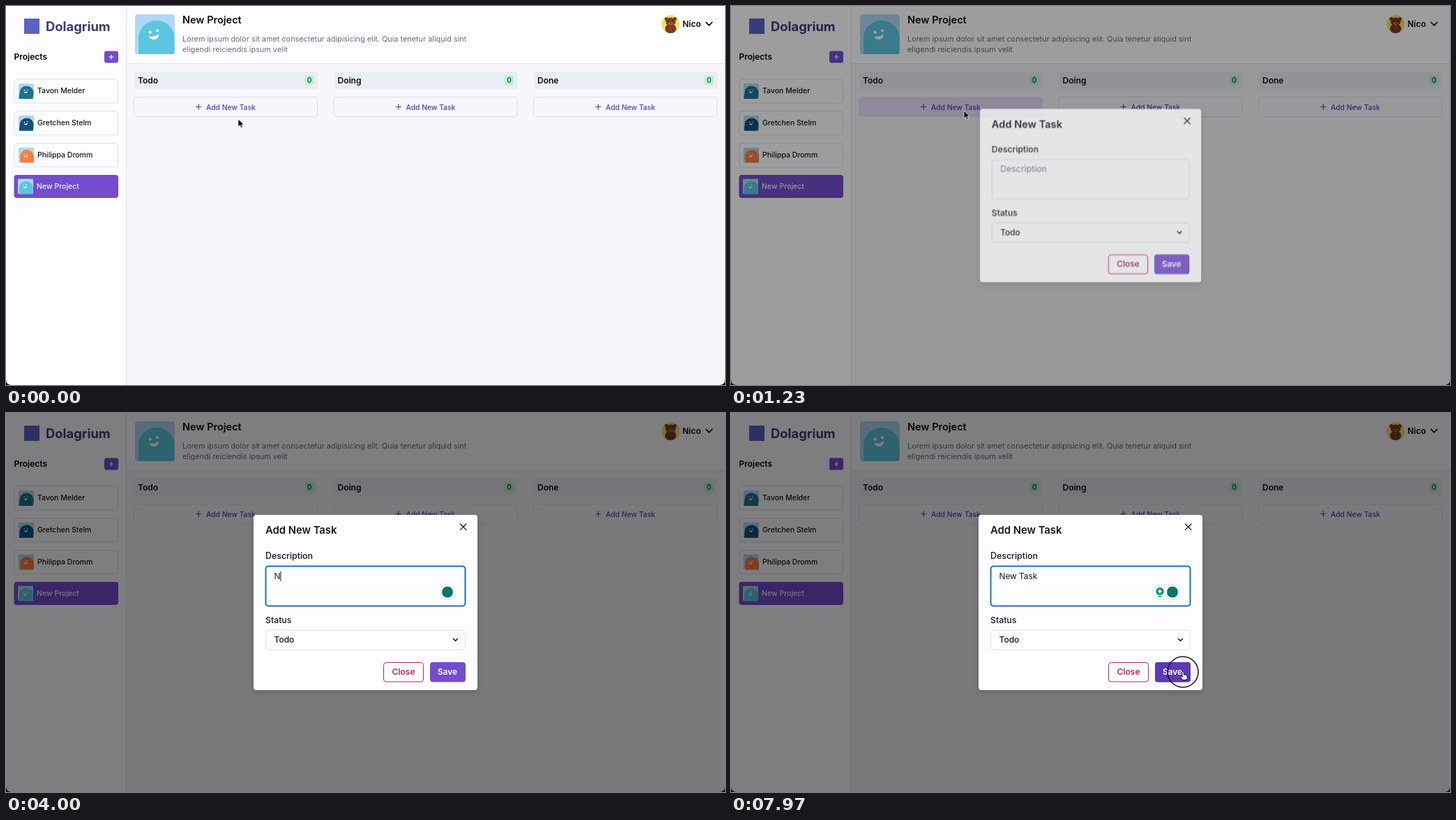
Recreate the animation shown at these times as an HTML page. Size 1031 px wide and 543 px high, loop 8 s.

```html
<!DOCTYPE html>
<html lang="en">
<head>
<meta charset="utf-8">
<title>Task board</title>
<style>
html, body { margin: 0; width: 100%; height: 100%; overflow: hidden; background: #000; }
svg { display: block; width: 1031px; height: 543px; font-family: Inter, "Open Sans", sans-serif; font-weight: 500; }
.line { fill: none; stroke-linecap: round; stroke-linejoin: round; }
.box { fill: none; stroke: #e1e0ea; }
.bold { font-weight: 600; }
.mid { text-anchor: middle; }
.loop { animation: 8s linear infinite; }
.step { animation: 8s step-end infinite; }

#backdrop { animation-name: fade; }
#modal { animation-name: pop; transform-origin: 515.5px 271.5px; }
#hover { animation-name: hover; }
#cursor { animation-name: move; }
#pointer { animation-name: seen; }
#arrow { animation-name: arrow; }
#hand, #saveHover { animation-name: onSave; }
#focus { animation-name: focus; }
#pill { animation-name: pill; }
#ring { animation-name: ring; }

@keyframes fade {
  0% { opacity: 0; }
  14.625% { opacity: 0; animation-timing-function: cubic-bezier(0, 0, .2, 1); }
  16.5%, 100% { opacity: 1; }
}
@keyframes pop {
  0% { opacity: 0; transform: scale(.95); }
  14.625% { opacity: 0; transform: scale(.95); animation-timing-function: cubic-bezier(0, 0, .2, 1); }
  16.5%, 100% { opacity: 1; transform: scale(1); }
}
@keyframes hover {
  0%, 5% { opacity: 0; }
  6.8%, 17.5% { opacity: 1; }
  19.4%, 100% { opacity: 0; }
}
@keyframes move {
  0% { transform: translate(333px, 162px); }
  3% { transform: translate(333px, 162px); animation-timing-function: ease-in-out; }
  10% { transform: translate(334px, 149px); }
  15.4% { transform: translate(334px, 150px); }
  25% { transform: translate(334px, 150px); animation-timing-function: ease-in; }
  31.625% { transform: translate(377px, 189px); animation-timing-function: ease-out; }
  39% { transform: translate(450px, 240px); }
  78% { transform: translate(450px, 240px); animation-timing-function: ease-in-out; }
  93%, 100% { transform: translate(648px, 371px); }
}
@keyframes seen { 0% { opacity: 1; } 48.75% { opacity: 0; } 78%, 100% { opacity: 1; } }
@keyframes arrow { 0% { opacity: 1; } 89.3%, 100% { opacity: 0; } }
@keyframes onSave { 0% { opacity: 0; } 89.3%, 100% { opacity: 1; } }
@keyframes focus { 0% { opacity: 0; } 42%, 100% { opacity: 1; } }
@keyframes pill { 0% { opacity: 0; } 80%, 100% { opacity: 1; } }
@keyframes ring { 0% { opacity: 0; } 99%, 100% { opacity: 1; } }
</style>
</head>
<body>
<svg viewBox="0 0 1031 543">
  <defs>
    <clipPath id="tile"><rect width="100" height="100" rx="7"/></clipPath>
    <clipPath id="round"><circle cx="953" cy="26" r="13"/></clipPath>
    <filter id="shadow" x="-10%" y="-10%" width="120%" height="125%">
      <feDropShadow dx="0" dy="4" stdDeviation="5" flood-opacity=".16"/>
    </filter>
  </defs>

  <rect width="1031" height="543" fill="#f6f6fb"/>
  <rect width="1031" height="82" fill="#fdfcff"/>
  <rect width="173" height="543" fill="#fdfcff"/>
  <path d="M172.5 0V543M173 82.5H1031" stroke="#e2e3eb"/>

  <rect x="26" y="18" width="22" height="22" fill="#5a62c4"/>
  <text x="57" y="35.5" font-size="18.4" font-weight="700" fill="#423a78">Dolagrium</text>
  <text x="11.5" y="77" font-size="12" class="bold">Projects</text>
  <rect x="141" y="64.5" width="20" height="17" rx="3" fill="#744cce"/>
  <path class="line" d="M148 73h6M151 70v6" stroke="#fff" stroke-width="1.2"/>
  <g id="projects"></g>

  <g id="portrait"></g>
  <text x="253" y="25" font-size="14.5" class="bold" fill="#0d0d12">New Project</text>
  <g font-size="10.87" font-weight="400" fill="#686c7c">
    <text x="253" y="51">Lorem ipsum dolor sit amet consectetur adipisicing elit. Quia tenetur aliquid sint</text>
    <text x="253" y="66">eligendi reiciendis ipsum velit</text>
  </g>

  <g clip-path="url(#round)">
    <rect x="940" y="13" width="26" height="26" fill="#f4df70"/>
    <g fill="#7a4022">
      <circle cx="947" cy="18.5" r="2.6"/><circle cx="959" cy="18.5" r="2.6"/>
      <ellipse cx="953" cy="22.5" rx="7.2" ry="6"/>
      <ellipse cx="953" cy="32.5" rx="8" ry="7"/>
    </g>
    <ellipse cx="953" cy="25" rx="3" ry="2.2" fill="#a9683c"/>
    <path class="line" d="M950 21.5h.1M956 21.5h.1M953 24.2h.1" stroke="#2a130a" stroke-width="1.6"/>
    <path class="line" d="M948 30l2 5M958 30l-2 5" stroke="#54280f"/>
  </g>
  <text x="970" y="30" font-size="12" class="bold" fill="#0d0d12">Nico</text>
  <path class="line" d="M1004 23.5l4.2 4.4 4.2-4.4" stroke="#0d0d12" stroke-width="1.8"/>

  <rect id="hover" class="loop" x="183.5" y="130.5" width="263" height="28" rx="4" fill="#e8dcf8"/>
  <g id="columns"></g>

  <rect id="backdrop" class="loop" width="1031" height="543" fill-opacity=".5"/>

  <g id="modal" class="loop">
    <rect x="355" y="146" width="321" height="251" rx="4" fill="#fdfcff" filter="url(#shadow)"/>
    <text x="372" y="173" font-size="14.8" class="bold" fill="#15151b">Add New Task</text>
    <path class="line" d="M651.5 159l8.4 8.4M659.9 159l-8.4 8.4" stroke="#15151b" stroke-width="1.3"/>
    <text x="372" y="209" font-size="12.4" fill="#15151b">Description</text>
    <rect class="box" x="372.5" y="219.5" width="286" height="57" rx="4"/>
    <g id="focus" class="step">
      <rect x="372.5" y="219.5" width="286" height="57" rx="4" fill="none" stroke="#1e6ebd" stroke-width="2"/>
      <circle cx="633" cy="256.5" r="10.5" fill="#fff" stroke="#d8dbe6"/>
      <g id="pill" class="step">
        <rect x="604.5" y="246" width="39" height="21" rx="10.5" fill="#fff" stroke="#d8dbe6"/>
        <circle cx="615" cy="255.5" r="5.8" fill="#129487"/>
        <path class="line" d="M613 263h4" stroke="#129487" stroke-width="1.5"/>
        <path d="M615 251.8l1.1 2.6 2.6 1.1-2.6 1.1-1.1 2.6-1.1-2.6-2.6-1.1 2.6-1.1z" fill="#fff"/>
      </g>
      <circle cx="633" cy="256.5" r="8" fill="#0d766b"/>
    </g>
    <text id="hint" x="384.5" y="237.5" font-size="12.5" font-weight="400" fill="#717788">Description</text>
    <text id="typed" x="384.5" y="237.5" font-size="11.8" font-weight="400" fill="#15151b"></text>
    <rect id="caret" y="227" width="1" height="14" fill="#15151b"/>

    <text x="372" y="300.5" font-size="12.3" fill="#15151b">Status</text>
    <rect class="box" x="372.5" y="311" width="286" height="28.5" rx="4"/>
    <text x="384.5" y="329" font-size="12" fill="#15151b">Todo</text>
    <path class="line" d="M641.5 323.5l3 3 3-3" stroke="#15151b" stroke-width="1.6"/>

    <g font-size="12" class="bold mid">
      <rect x="541.5" y="357.5" width="57" height="27.5" rx="4" fill="none" stroke="#b42a60"/>
      <text x="570" y="375.3" fill="#b42a60">Close</text>
      <rect x="608" y="357" width="51" height="28.5" rx="4" fill="#744cce"/>
      <rect id="saveHover" class="step" x="608" y="357" width="51" height="28.5" rx="4" fill="#5c3ab4"/>
      <text x="633" y="375.3" fill="#fff">Save</text>
    </g>
  </g>

  <circle id="ring" class="step" cx="648" cy="371" r="22" fill="none" stroke="#15151b" stroke-width="1.5"/>
  <g id="cursor" class="loop">
    <g id="pointer" class="step">
      <path id="arrow" class="step" d="M0 0V11L2.6 8.7 4.3 12.6 6.2 11.8 4.5 8H8Z" stroke="#fff" stroke-width=".7"/>
      <path id="hand" class="step" d="M-1.5 .3Q0-1.3 1 .6L1.7 4.2Q3 3.4 3.8 4.6 5 4 5.7 5.3L6.4 8.2 5 11.5H-.3L-3.2 7.6Q-3.8 6-2.3 6.2L-.6 7.2Z" fill="#fff" stroke="#15151b" stroke-linejoin="round"/>
    </g>
  </g>
  <path d="M0 535V543H8Q0 543 0 535M1031 535V543H1023Q1031 543 1031 535"/>
</svg>

<script>
const $ = id => document.getElementById(id);

const face = (x, y, size, color, tilt) => `
  <g transform="translate(${x} ${y}) scale(${size / 100})" clip-path="url(#tile)">
    <rect width="100" height="100" fill="#aed9f4"/>
    <g transform="rotate(${tilt} 50 50)">
      <path d="M99 59C99 35 79 16 54 16S9 35 9 59V150H99Z" fill="${color}"/>
      <g fill="#fff">
        <circle cx="38" cy="45" r="3.6"/><circle cx="56" cy="41" r="3.6"/>
        <path d="M35 55Q48 58 60 49 59 62 49 63 39 64 35 55"/>
      </g>
    </g>
  </g>`;

const project = ([name, color, tilt], i) => {
  const y = 105 + i * 45.8, active = i === 3, dx = active ? -1 : 0;
  const box = active
    ? `<rect x="11.5" y="242" width="149.5" height="33" rx="4" fill="#744cce"/>`
    : `<rect class="box" x="12" y="${y}" width="148.5" height="34" rx="4"/>`;
  return box + face(18 + dx, y + 6 + dx, 22, color, tilt) +
    `<text x="${45 + dx}" y="${y + 20.4 + dx / 2}" font-size="10.5" fill="${active ? "#f1ebff" : "#15151b"}">${name}</text>`;
};

const column = (name, i) => `
  <g transform="translate(${i * 286.5} 0)">
    <rect x="184" y="94" width="263" height="25" rx="3" fill="#e9edf4"/>
    <text x="189" y="110.5" font-size="12" class="bold" fill="#0d0d12">${name}</text>
    <rect x="428.5" y="99.5" width="13" height="13.5" rx="3" fill="#bdf0cf"/>
    <text x="435" y="110" font-size="10" class="bold mid" fill="#17603a">0</text>
    <rect class="box" x="183.5" y="130.5" width="263" height="28" rx="4"/>
    <path class="line" d="M272.5 144.5h7.5M276.25 140.75v7.5" stroke="#5b3cb2" stroke-width="1.2"/>
    <text x="287" y="148.5" font-size="10.3" fill="#5b3cb2">Add New Task</text>
  </g>`;

$("projects").innerHTML = [
  ["Tavon Melder", "#20708f", 8],
  ["Gretchen Stelm", "#10507a", 6],
  ["Philippa Dromm", "#f77f3e", -4],
  ["New Project", "#5bc6de", 0]
].map(project).join("");
$("portrait").innerHTML = face(185, 12, 57, "#5bc6de", 0);
$("columns").innerHTML = ["Todo", "Doing", "Done"].map(column).join("");

// Typing and the blinking caret
const LOOP = 8000, FOCUS = 3360, FIRST_KEY = 3900, KEY = 200, TEXT = "New Task";
const typed = $("typed"), caret = $("caret"), hint = $("hint");
let start;

function draw(now) {
  start ??= now;
  const t = (now - start) % LOOP;
  const keys = Math.floor((t - FIRST_KEY) / KEY) + 1;
  const count = Math.max(0, Math.min(TEXT.length, keys));
  const text = TEXT.slice(0, count).replace(/ $/, "\u00a0");
  if (typed.textContent !== text) typed.textContent = text;
  hint.style.opacity = count ? 0 : 1;

  const lastKey = count ? FIRST_KEY + (count - 1) * KEY : FOCUS;
  const on = t >= FOCUS && (t - lastKey) % 1000 < 500;
  caret.style.opacity = on ? 1 : 0;
  caret.setAttribute("x", 384.5 + (count ? typed.getComputedTextLength() : 0));
  requestAnimationFrame(draw);
}
requestAnimationFrame(draw);
</script>
</body>
</html>
```
